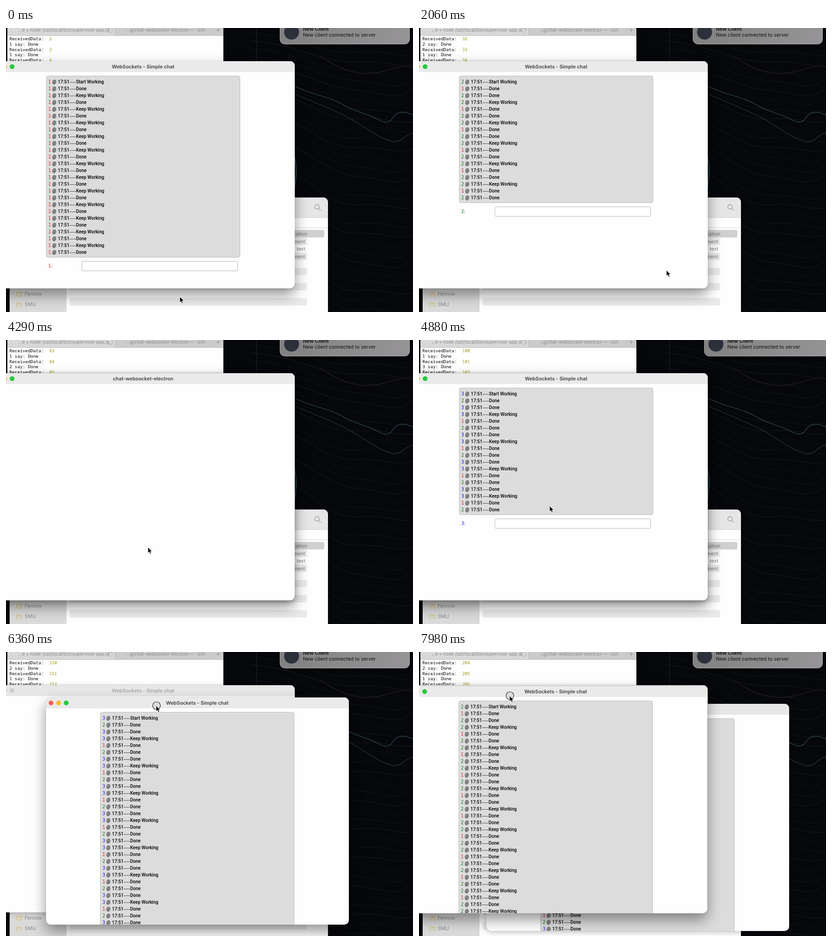
Recreate the animation shown at these times as an HTML page. Size 895x625 px, loop 8000 ms.

```html
<!DOCTYPE html>
<html lang="en">
<head>
<meta charset="utf-8">
<title>Chat windows</title>
<style>
html, body { margin: 0; width: 100%; height: 100%; overflow: hidden; background: #06070b; }
#stage { position: absolute; left: 0; top: 0; width: 895px; height: 625px; overflow: hidden; }
svg { position: absolute; left: 0; top: 0; display: block; }
text { font: 10.85px Inter, sans-serif; white-space: pre; }
.bold { font-weight: 600; }
.small { font-size: 9.2px; }
.mono { font: 500 9.7px "Noto Sans Mono", monospace; }
.chat text { font: 500 10px Roboto, sans-serif; }
.chat .wide { font: 9.6px "DejaVu Sans", sans-serif; }
.chat .title { font: 600 10.85px Inter, sans-serif; text-anchor: middle; fill: #3f403f; }
.win { position: absolute; overflow: hidden; border-radius: 10px; background: #fefefe;
  box-shadow: 0 4px 12px rgba(0,0,0,.2), 0 0 1px rgba(0,0,0,.4); }
.win.on { box-shadow: 0 14px 30px rgba(0,0,0,.42), 0 0 1px rgba(0,0,0,.5); }
.bar { fill: #e9eae9; }
.win:not(.on) .bar { fill: #e6e7e6; }
.win:not(.on) .lights circle { fill: #cdcdcd; }
.win:not(.on) .title { fill: #a6a6a6; }
.win:not(.on) .icons { opacity: .55; }
.win:not(.on) .side { opacity: .5; }
.finder .bar { fill: #f0f1f0; }
.finder:not(.on) .bar { fill: #e5e6e5; }
.pick { fill: #dfa616; }
.pickText text { fill: #fdf3d8; }
.finder:not(.on) .pick { fill: #d0d0d0; }
.finder:not(.on) .pickText text { fill: #747474; }
.finder.on .idle, .finder:not(.on) .busy { display: none; }
#note { position: absolute; left: 602px; top: -30px; width: 284px; height: 64px; border: 1px solid #a3a2a3;
  border-radius: 11px; background: linear-gradient(100deg, #828182, #969496); box-shadow: 0 3px 8px rgba(0,0,0,.4); }
#cursor { z-index: 50; overflow: visible; }
</style>
</head>
<body>
<div id="stage"></div>
<script>
const stage = document.getElementById('stage');
const range = n => [...Array(n).keys()];
const text = (x, y, s, attrs = '') => `<text x="${x}" y="${y}" ${attrs}>${s}</text>`;
const rect = (x, y, w, h, attrs = '') => `<rect x="${x}" y="${y}" width="${w}" height="${h}" ${attrs}/>`;
const circle = (x, y, r, attrs = '') => `<circle cx="${x}" cy="${y}" r="${r}" ${attrs}/>`;
const path = (d, attrs = '') => `<path d="${d}" fill="none" ${attrs}/>`;
const lights = (x, y) => '<g class="lights">' +
  ['#fe5f57', '#febc2e', '#28c840'].map((c, i) => circle(x + i * 16.7, y, 5.3, `fill="${c}"`)).join('') + '</g>';

function add(html) {
  stage.insertAdjacentHTML('beforeend', html);
  return stage.lastElementChild;
}
// Window contents are drawn in stage coordinates.
function addWindow(cls, x, y, w, h, body) {
  return add(`<div class="win ${cls}" style="left:${x}px;top:${y}px;width:${w}px;height:${h}px">
    <svg width="${w}" height="${h}" viewBox="${x} ${y} ${w} ${h}">${body}</svg></div>`);
}

// --- wallpaper ---
const streaks = range(34).map(i => {
  const y = -40 + i * 17, fall = 30 + i * 4, bend = 8 * Math.sin(i * .7);
  return path(`M540 ${y} C650 ${y + 10} 690 ${y + fall + bend} 770 ${y + fall} S850 ${y + fall + 20 - bend} 900 ${y + fall + bend}`,
    `stroke="${i % 3 ? '#363a40' : '#22383e'}" opacity="${.3 + .12 * Math.sin(i * 2.1)}"`);
}).join('');
add(`<svg width="895" height="625"><rect width="895" height="625" fill="#06070b"/>${streaks}
  ${path('M551 0V74', 'stroke="#777" stroke-dasharray="2 3" opacity=".6"')}
  ${path('M630 126C680 150 710 150 740 168S790 186 820 202S848 192 862 187S885 188 900 193', 'stroke="#36585c" stroke-width="1.6" opacity=".65"')}
  ${path('M630 143C680 165 735 185 770 207S830 246 850 250S880 229 900 232', 'stroke="#484c50" stroke-width="1.2" opacity=".65"')}
  ${path('M690 62C740 95 775 103 810 99S860 80 900 86', 'stroke="#4a444a" opacity=".6"')}
  ${path('M634 280C642 315 636 340 632 372', 'stroke="#2d5157" stroke-width="2"')}
</svg>`);

// --- terminal ---
const spokes = range(12).map(i =>
  `<line x1="0" y1="-3.5" x2="0" y2="-6.5" stroke="#777" opacity="${.1 + i * .06}" transform="rotate(${i * 30})"/>`).join('');
const terminal = addWindow('terminal', 3, -30, 475, 330,
  rect(3, -30, 475, 330, 'fill="#fefefe"') + rect(3, -30, 237, 46, 'fill="#d7d8d7"') + rect(240, -30, 238, 46, 'fill="#cbcccb"') +
  path('M240.5 0V16M455.5 0V16M3 16.5H478', 'stroke="#b9b9b9"') + path('M462 4.5h9M466.5 0v9', 'stroke="#8e8e8e"') +
  text(27, 8, '…e • node /usr/local/bin/supervisor app.js', 'fill="#8b8b8b" style="font-size:10px"') +
  text(264, 8, '…g/chat-websocket-electron — -zsh', 'fill="#8b8b8b" style="font-size:10px"') +
  `<g transform="translate(230 5)"><g id="spin">${spokes}</g></g>` +
  range(5).map(i => text(7.5, 27 + i * 11.75, i % 2 ? '' : 'ReceivedData:', 'class="mono log"') +
    text(95, 27 + i * 11.75, '', 'class="mono num" fill="#a09a10"')).join(''));
terminal.style.borderRadius = 0;
const logs = terminal.querySelectorAll('.log'), nums = terminal.querySelectorAll('.num');

// --- file browser ---
const gold = 'stroke="#dda31c" stroke-width="1.1"';
const folder = path('M24 -4v9h11v-7.5h-6l-1.5 -1.5zM24 -.5h11', gold);
const side = [
  ['FarToss', circle(29, 0, 5, 'fill="#dda31c"')],
  ['Recents', circle(29, 0, 5, 'fill="none" ' + gold) + path('M29 -3V.5H32', gold)],
  ['Applications', path('M25 5L30 -5M28 -5L33 5M23 2H35', gold)],
  ['Desktop', path('M24 -4h11v8h-11zM24 2h11', gold)],
  ['Downloads', circle(29, 0, 5, 'fill="none" ' + gold) + path('M29 -3V3M27 1L29 3L31 1', gold)],
  ['Documents', path('M25 -5h5l3 3v7h-8zM30 -5v3h3', gold)],
  ['Fenrow', folder],
  ['SMU', folder]
].map(([name, icon], i) => `<g transform="translate(0 ${444.5 + i * 23.35})">${icon}${text(41, 4, name, 'fill="#3a3a3a"')}</g>`).join('');

const page = path('M156 -6h6l3 3v9h-9z', 'stroke="#c4c4c4" style="fill:#fff"');
const files = [
  ['chat-websocket-electron', '211.8 MB', 'Application', circle(160, 0, 6.5, 'fill="#2b2f3c"')],
  ['LICENSE', '1 KB', 'Document', page],
  ['LICENSES.chromium.html', '6.6 MB', 'HTML text', page + circle(160, 0, 3.5, 'fill="#d9a03a"')],
  ['version', '6 bytes', 'Document', page + path('M158 2h5M158 4h5', 'stroke="#bbb"')]
].map(([name, size, kind, icon], i) => `<g class="${i ? '' : 'pickText'}" transform="translate(0 ${453 + i * 16.65})" fill="#7d7d7d">
  ${icon}${text(171, 4, name, 'fill="#262626"')}${text(373, 4, 'Today at 3:31 PM')}
  ${text(593, 4, size, 'text-anchor="end"')}${text(605, 4, kind)}</g>`).join('');

const stripe = (row, w, color) => rect(140, 444.5 + row * 16.65, w, 16.5, `rx="4" fill="${color}"`);
const ink = 'stroke="#626362" stroke-width="1.3"';
const finder = addWindow('finder', 8, 373, 700, 330,
  rect(8, 373, 124, 330, 'fill="#d9dad9"') + rect(132, 373, 576, 44, 'class="bar"') +
  path('M132.5 373V703M132 417.5H708M132 439.5H708', 'stroke="#d8d8d8"') +
  path('M367.5 420V437M518.5 420V437M598.5 420V437', 'stroke="#dcdcdc"') +
  '<g class="busy">' + [1, 3, 5].map(r => stripe(r, 230, '#f3f4f3')).join('') + '</g>' +
  '<g class="idle">' + [1, 3, 5, 7, 9].map(r => stripe(r, 522, '#ebebeb')).join('') + '</g>' +
  rect(140, 444.5, 560, 16.5, 'rx="4" class="pick"') + files + lights(29, 395) +
  '<g class="side">' + text(21, 428.5, 'Favorites', 'class="small bold" fill="#8f8f8f"') + side + '</g><g class="icons">' +
  text(205, 399.5, 'chat-websocket-electron-darw...', 'class="bold" fill="#3b3c3b" style="font-size:12.4px"') +
  path('M158 389l-6 6l6 6M421.5 390h11M421.5 395h11M421.5 400h11M418 390h1.5M418 395h1.5M418 400h1.5M439.5 392.5l3 -3l3 3M439.5 397.5l3 3l3 -3M514.5 393.5l3 3l3 -3M628 393.5l3 3l3 -3', ink) +
  path('M182 389l6 6l-6 6', 'stroke="#b3b3b3" stroke-width="1.3"') +
  range(6).map(i => rect(492.5 + i % 3 * 5.7, 390 + (i / 3 | 0) * 7, 4, 4, 'fill="none" ' + ink)).join('') + path('M492 387.5h16', ink) +
  path('M543 392h-2.5v9.5h11v-9.5h-2.5M546 397v-10M543 390l3 -3l3 3M571.5 396l7.5 -8h6.5v6.5l-8 7.5z', ink) + circle(582.5, 391, 1, 'fill="#626362"') +
  circle(614, 395, 6.5, 'fill="none" ' + ink) + [611, 614, 617].map(x => circle(x, 395, 1, 'fill="#626362"')).join('') +
  circle(684, 393.5, 5, 'fill="none" ' + ink) + path('M687.5 397l4.5 4.5', ink) + '</g>' +
  text(171, 431, 'Name', 'class="small bold" fill="#333"') + path('M353.5 430l3 -3l3 3', 'stroke="#888"') +
  [[373, 'Date Modified'], [524, 'Size'], [605, 'Kind']].map(([x, s]) => text(x, 431, s, 'class="small" fill="#7b7b7b"')).join(''));

// --- chat windows ---
const MAX_ROWS = 32;
const colors = { 1: '#f01414', 2: '#0a800a', 3: '#1414f0' };
const phrases = { K: 'Keep Working', D: 'Done' };

function makeChat({ id, cycle, opens, starts, rate, rowsAtStart = 0 }) {
  const rows = range(MAX_ROWS).map(r => {
    const [who, kind] = cycle[r % cycle.length];
    const name = r ? who : id, y = 121.5 + r * 15;
    return `<g class="row">${text(93, y, name, `class="wide" fill="${colors[name]}"`)}${text(101.8, y, '@')}${text(114, y, '17:51')}` +
      `${text(139.8, y, '----', 'class="wide"')}${text(154, y, r ? phrases[kind] : 'Start Working')}</g>`;
  }).join('');
  const el = addWindow('chat', -31, 73, 666, 500,
    rect(-31, 73, 666, 24, 'class="bar"') + lights(-20, 85) + text(301.5, 88.5, '', 'class="title"') +
    '<g class="body">' + rect(88.5, 105.5, 426, 10, 'class="box" rx="4" fill="#dcdcdc" stroke="#bdbdbd"') + rows +
    '<g class="entry">' + text(93, 22.5, id + ':', `class="wide" fill="${colors[id]}"`) +
    rect(167, 9.5, 342.5, 21, 'rx="2" fill="#fff" stroke="#b5b5b5"') + '</g></g>');
  const find = s => el.querySelector(s);
  const title = find('.title'), body = find('.body'), box = find('.box'), entry = find('.entry');
  const rowEls = el.querySelectorAll('.row');
  const draw = f => {
    el.style.display = f < opens ? 'none' : '';
    const live = f >= starts;
    title.textContent = live ? 'WebSockets - Simple chat' : 'chat-websocket-electron';
    body.style.display = live ? '' : 'none';
    const n = Math.max(1, Math.min(MAX_ROWS, Math.round(rowsAtStart + rate * (f - starts))));
    rowEls.forEach((row, i) => row.style.display = i < n ? '' : 'none');
    box.setAttribute('height', n * 15 + 9);
    entry.setAttribute('transform', `translate(0 ${104.5 + n * 15 + 9.5})`);
  };
  return { el, draw };
}
const chat1 = makeChat({ id: 1, cycle: ['1K', '1D'], opens: 0, starts: 0, rate: 3.4, rowsAtStart: 26 });
const chat2 = makeChat({ id: 2, cycle: ['2K', '1D', '2D'], opens: 9, starts: 10.5, rate: 5.14 });
const chat3 = makeChat({ id: 3, cycle: ['1D', '2D', '3D', '3K'], opens: 28, starts: 30.3, rate: 6.6 });
const chats = [chat1, chat2, chat3];

// --- notification and pointer ---
const note = add(`<div id="note"><svg width="284" height="64" viewBox="603 -29 284 64">
  ${circle(628, 9, 16.5, 'fill="#2b303b"')}
  ${text(653, 6, 'New Client', 'class="bold" fill="#111"')}${text(653, 19, 'New client connected to server', 'fill="#111"')}
</svg></div>`);
note.style.zIndex = 40;
const cursor = add(`<svg id="cursor" width="20" height="20">
  ${circle(1, 0, 8.5, 'id="ring" fill="rgba(120,120,120,.12)" stroke="#222" stroke-width="1.2"')}
  <path d="M0 0V13L3 10.3L5 15L7.4 14L5.4 9.4H9.4Z" fill="#000" stroke="#fff" stroke-width="1"/></svg>`);
const ring = document.getElementById('ring'), spin = document.getElementById('spin');

// --- motion tables, keyed by step ---
const LOOP = 8000, STEP = 147.8, LEAD = 20;
const pointer = [[0, 382, 591], [2, 382, 591], [6, 310, 456], [9, 310, 456], [14, 544, 533], [16, 545, 592], [18, 545, 592],
  [23, 312, 456], [31, 312, 456], [39, 211, 91], [41, 211, 91], [44, 390, 132], [45, 390, 132], [47, 227, 45], [51, 200, 94], [53, 200, 94], [54, 199, 96]];
const count = [[0, 2], [7, 14], [10.4, 20], [14, 32], [29, 83], [30.3, 87], [40, 136], [47, 169], [54, 204]];
const drag3 = [[41, 0, 0], [44, 179, 41]];
const drag2 = [[53, 0, 0], [54, -1, 2]];
const slide = [[11, 0], [12, 150], [13, 25], [14, 0], [31, 0], [32, 150], [33, 25], [34, 0]];
const presses = [[1, 1], [7, 8], [17, 17], [25, 26], [41, 44], [53, 54]];
const raises = [[0, finder], [0, chat1.el], [2, finder], [9, chat2.el], [18, finder], [28, chat2.el], [28, chat3.el], [53, chat2.el]];

function at(keys, f) {
  const i = keys.findIndex(k => k[0] >= f);
  if (i < 0) return keys[keys.length - 1].slice(1);
  if (!i) return keys[0].slice(1);
  const a = keys[i - 1], b = keys[i], u = (f - a[0]) / (b[0] - a[0]);
  return a.slice(1).map((v, j) => v + (b[j + 1] - v) * u);
}
// Clients reply in turn; a second and a third one join later.
const speaker = n => n < 22 ? 1 : n < 88 ? 2 - n % 2 : [2, 1, 3][n % 3];
const move = (el, [x, y = 0]) => el.style.transform = `translate(${Math.round(x)}px, ${Math.round(y)}px)`;

function render(f) {
  const n = Math.floor(at(count, f)[0] + 1e-6);
  [0, 1, 2].forEach(i => nums[i * 2].textContent = n + i);
  [0, 1].forEach(i => logs[i * 2 + 1].textContent = `${speaker(n + i)} say: Done`);
  spin.setAttribute('transform', `rotate(${f * 60})`);

  const raised = raises.filter(([step]) => step <= f);
  raised.forEach(([, el], i) => el.style.zIndex = i + 1);
  const front = raised[raised.length - 1][1];
  chats.forEach(c => c.draw(f));
  [finder, ...chats.map(c => c.el)].forEach(el => el.classList.toggle('on', el === front));

  move(chat2.el, at(drag2, f));
  move(chat3.el, at(drag3, f));
  move(note, at(slide, f));
  move(cursor, at(pointer, f));
  ring.style.display = presses.some(([a, b]) => f >= a && f <= b) ? '' : 'none';
}

let shown = -1;
function tick() {
  const f = Math.floor((performance.now() % LOOP + LEAD) / STEP);
  if (f !== shown) render(shown = f);
  requestAnimationFrame(tick);
}
tick();
</script>
</body>
</html>
```
